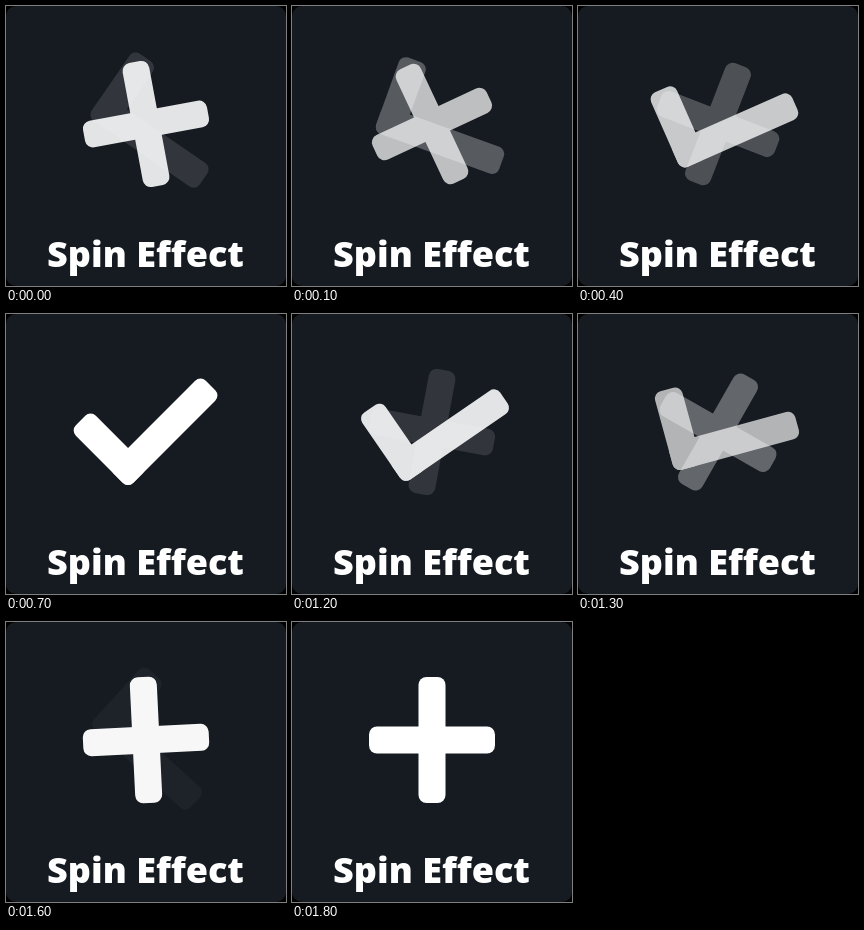
Recreate the animation shown at these times as an HTML page. Size 280x280 px, loop 3 s.

```html
<!DOCTYPE html>
<html lang="en">
<head>
<meta charset="utf-8">
<title>Spin Effect</title>
<style>
  html, body { margin: 0; width: 100%; height: 100%; overflow: hidden; background: #000; }
  svg { display: block; width: 100vw; height: 100vh; }
  text { font: 800 36px "Open Sans", "Noto Sans", sans-serif; text-anchor: middle; }
</style>
</head>
<body>
<svg viewBox="0 0 280 280" fill="#fff">
  <rect width="280" height="280" rx="10" fill="#161b22"/>
  <g transform="translate(140 118)">
    <g id="plus">
      <rect x="-63" y="-13.5" width="126" height="27" rx="8"/>
      <rect x="-13.5" y="-63" width="27" height="126" rx="8"/>
    </g>
    <g id="check">
      <g transform="rotate(-45)">
        <rect x="-52.3" y="-1.4" width="130.8" height="28.3" rx="7.5"/>
        <rect x="-52.3" y="-54.4" width="28.3" height="81.3" rx="7.5"/>
      </g>
    </g>
  </g>
  <text x="139.5" y="261">Spin Effect</text>
</svg>
<script>
  const LOOP = 3000, STEP = 100, BACK = 1200;
  const plus = document.getElementById("plus");
  const check = document.getElementById("check");
  const clamp = v => Math.min(1, Math.max(0, v));

  // 0 = plus, 1 = check
  function progress(t) {
    return t < BACK
      ? clamp(0.117 + t * 0.00162)
      : 1 - clamp(0.117 + (t - BACK) * 0.00213);
  }

  function pose(icon, angle, opacity) {
    icon.setAttribute("transform", `rotate(${angle})`);
    icon.setAttribute("opacity", opacity);
  }

  function draw(time) {
    const t = Math.floor((time % LOOP) / STEP) * STEP;
    const p = progress(t);
    pose(plus, -90 * p, 1 - p);
    pose(check, 90 * (1 - p), p);
  }

  const start = performance.now();
  function tick() {
    draw(performance.now() - start);
    requestAnimationFrame(tick);
  }
  tick();
</script>
</body>
</html>
```
